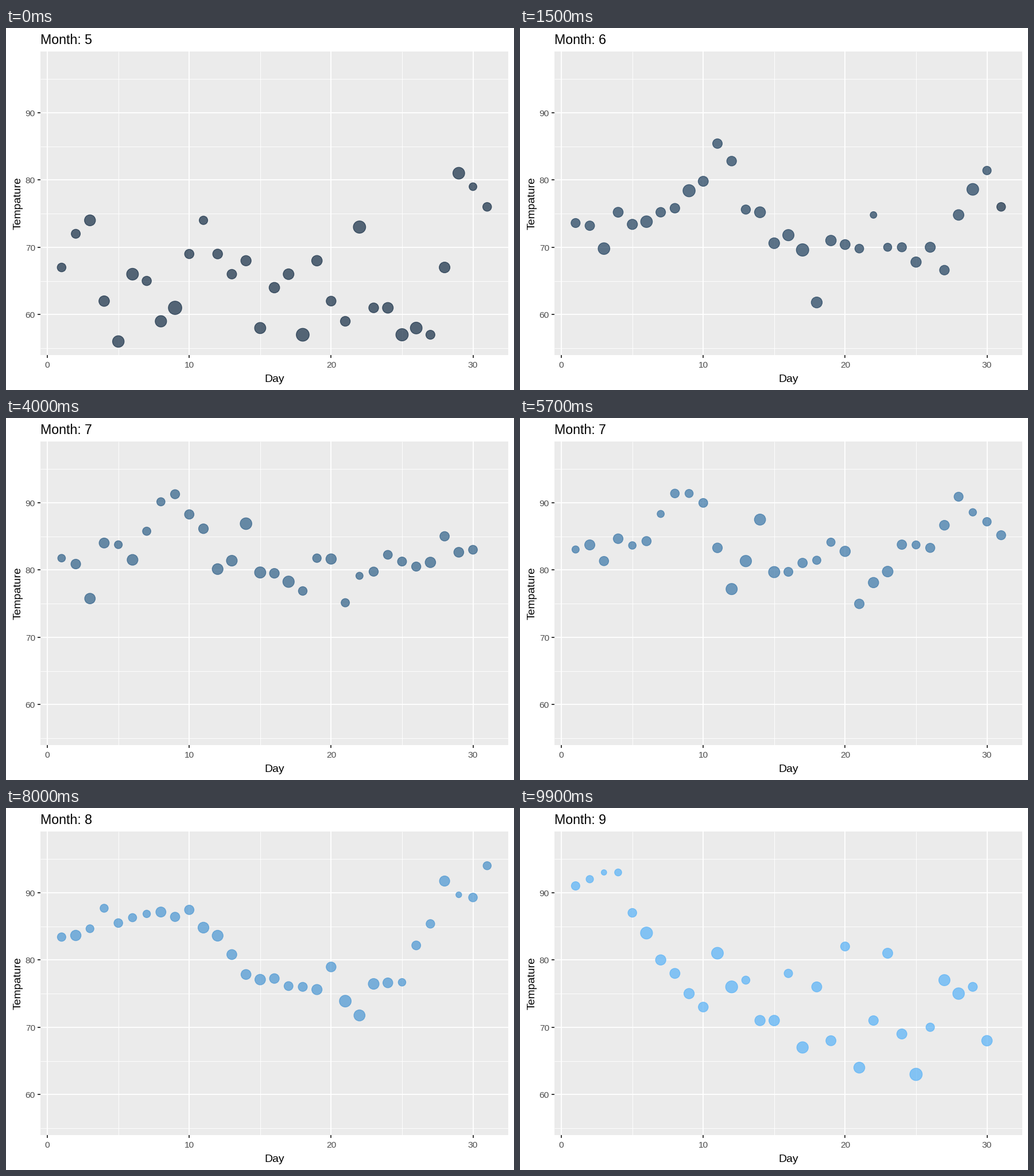
A matplotlib script that plays this animation: 885x632 px, repeating every 10 s.

```python
import numpy as np
import matplotlib.pyplot as plt
from matplotlib.animation import FuncAnimation
from matplotlib.patches import Rectangle

W, H, DPI = 885, 632, 100
RES = W / 7                      # pixels per inch of the plot layout
PT = 72 / DPI                    # points per screen pixel
LEFT, RIGHT, TOP, BOTTOM = 59.8, 875.3, 41.4, 571.4
FRAMES = 100
KEYS = [0, 25, 49, 74, 99]       # frame at which each month is reached

plt.rcParams["font.family"] = "Liberation Sans"

# Daily temperature, then wind speed
MAY = ([67, 72, 74, 62, 56, 66, 65, 59, 61, 69, 74, 69, 66, 68, 58, 64,
        66, 57, 68, 62, 59, 73, 61, 61, 57, 58, 57, 67, 81, 79, 76],
       [7.4, 8, 12.6, 11.5, 14.3, 14.9, 8.6, 13.8, 20.1, 8.6, 6.9, 9.7, 9.2,
        10.9, 13.2, 11.5, 12, 18.4, 11.5, 9.7, 9.7, 16.6, 9.7, 12, 16.6,
        14.9, 8, 12, 14.9, 5.7, 7.4])
JUNE = ([78, 74, 67, 84, 85, 79, 82, 87, 90, 87, 93, 92, 82, 80, 79, 77,
         72, 65, 73, 76, 77, 76, 76, 76, 75, 78, 73, 80, 77, 83],
        [8.6, 9.7, 16.1, 9.2, 8.6, 14.3, 9.7, 6.9, 13.8, 11.5, 10.9, 9.2, 8,
         13.8, 11.5, 14.9, 20.7, 9.2, 11.5, 10.3, 6.3, 1.7, 4.6, 6.3, 8, 8,
         10.3, 11.5, 14.9, 8])
JULY = ([84, 85, 81, 84, 83, 83, 88, 92, 92, 89, 82, 73, 81, 91, 80, 81,
         82, 84, 87, 85, 74, 81, 82, 86, 85, 82, 86, 88, 86, 83, 81],
        [4.1, 9.2, 9.2, 10.9, 4.6, 10.9, 5.1, 6.3, 5.7, 7.4, 8.6, 14.3, 14.9,
         14.9, 14.3, 6.9, 10.3, 6.3, 5.1, 11.5, 6.9, 9.7, 11.5, 8.6, 8, 8.6,
         12, 7.4, 7.4, 7.4, 9.2])
AUGUST = ([81, 81, 82, 86, 85, 87, 89, 90, 90, 92, 86, 86, 82, 80, 79, 77,
           79, 76, 78, 78, 77, 72, 75, 79, 81, 86, 88, 97, 94, 96, 94],
          [6.9, 13.8, 7.4, 6.9, 7.4, 4.6, 4, 10.3, 8, 8.6, 11.5, 11.5, 11.5,
           9.7, 11.5, 10.3, 6.3, 7.4, 10.9, 10.3, 15.5, 14.3, 12.6, 9.7, 3.4,
           8, 5.7, 9.7, 2.3, 6.3, 6.3])
SEPTEMBER = ([91, 92, 93, 93, 87, 84, 80, 78, 75, 73, 81, 76, 77, 71, 71, 78,
              67, 76, 68, 82, 64, 71, 81, 69, 63, 70, 77, 75, 76, 68],
             [6.9, 5.1, 2.8, 4.6, 7.4, 15.5, 10.9, 10.3, 10.9, 9.7, 14.9,
              15.5, 6.3, 10.9, 11.5, 6.9, 13.8, 10.3, 10.3, 8, 12.6, 9.2,
              10.3, 10.3, 16.6, 6.9, 13.2, 14.3, 8, 11.5])

RGB_XYZ = np.array([[.4124564, .3575761, .1804375],
                    [.2126729, .7151522, .0721750],
                    [.0193339, .1191920, .9503041]])
WHITE = RGB_XYZ.sum(axis=1)


def to_lab(rgb):
    c = np.array(rgb) / 255
    c = np.where(c > .04045, ((c + .055) / 1.055) ** 2.4, c / 12.92)
    f = RGB_XYZ @ c / WHITE
    f = np.where(f > .008856, np.cbrt(f), 7.787 * f + 16 / 116)
    return np.array([116 * f[1] - 16, 500 * (f[0] - f[1]), 200 * (f[1] - f[2])])


def to_rgb(lab):
    fy = (lab[0] + 16) / 116
    f = np.array([fy + lab[1] / 500, fy, fy - lab[2] / 200])
    f = np.where(f > .206893, f ** 3, (f - 16 / 116) / 7.787)
    c = np.clip(np.linalg.solve(RGB_XYZ, f * WHITE), 0, 1)
    return np.where(c > .0031308, 1.055 * c ** (1 / 2.4) - .055, 12.92 * c)


DARK, LIGHT = to_lab([0x13, 0x2B, 0x43]), to_lab([0x56, 0xB1, 0xF7])


def shade(u):
    return (*to_rgb(DARK + (LIGHT - DARK) * u), .7)


def px(day):
    return LEFT + (np.asarray(day) + .5) / 33 * (RIGHT - LEFT)


def py(temp):
    return BOTTOM - (np.asarray(temp) - 53.95) / 45.1 * (BOTTOM - TOP)


def radius(wind):
    size = 1 + 5 * np.sqrt((np.asarray(wind) - 1.7) / 19)
    return .375 * (size * 72.27 / 25.4 + .945) * RES / 72


# One row per day: vertical position and radius
MONTHS = [np.column_stack([py(temp), radius(wind)])
          for temp, wind in (MAY, JUNE, JULY, AUGUST, SEPTEMBER)]

fig = plt.figure(figsize=(W / DPI, H / DPI), dpi=DPI, facecolor="white")
ax = fig.add_axes([0, 0, 1, 1])
ax.set(xlim=(0, W), ylim=(H, 0))
ax.axis("off")


def line(x, y, width, color="white"):
    ax.plot(x, y, color=color, lw=width * PT, solid_capstyle="butt", zorder=1)


def label(x, y, text, size, color="black", ha="center", **kw):
    return ax.text(x, y, text, fontsize=size * RES / DPI, color=color,
                   ha=ha, va="baseline", **kw)


ax.add_patch(Rectangle((LEFT, TOP), RIGHT - LEFT, BOTTOM - TOP,
                       fc="#EBEBEB", lw=0, zorder=0))
for temp in range(55, 100, 5):
    line([LEFT, RIGHT], [py(temp)] * 2, .94 if temp % 10 else 1.87)
for day in range(0, 31, 5):
    line([px(day)] * 2, [TOP, BOTTOM], .94 if day % 10 else 1.87)
for temp in range(60, 100, 10):
    line([LEFT - 4.8, LEFT], [py(temp)] * 2, 1.87, "#333333")
    label(51, py(temp) + 6, str(temp), 8.8, "#4D4D4D", "right")
for day in range(0, 31, 10):
    line([px(day)] * 2, [BOTTOM, BOTTOM + 4.8], 1.87, "#333333")
    label(px(day), 593, str(day), 8.8, "#4D4D4D")

label((LEFT + RIGHT) / 2, 618, "Day", 11)
label(25.4, (TOP + BOTTOM) / 2, "Tempature", 11,
      rotation=90, rotation_mode="anchor")
title = label(LEFT, 28, "", 13.2, ha="left")
dots = ax.scatter([], [], zorder=2)
dots.set_linewidth(.945 / 96 * RES * PT)


def update(i):
    m = int(np.searchsorted(KEYS, i, side="right")) - 1
    state = MONTHS[m].copy()
    colors = [shade(m / 4)] * len(state)
    if m < 4:
        t = (i - KEYS[m]) / (KEYS[m + 1] - KEYS[m])
        # A day missing from the next month waits unchanged, then vanishes
        n = min(len(state), len(MONTHS[m + 1]))
        state[:n] += (MONTHS[m + 1][:n] - state[:n]) * t
        colors[:n] = [shade((m + t) / 4)] * n
    y, r = state.T
    dots.set_offsets(np.column_stack([px(np.arange(1, len(y) + 1)), y]))
    dots.set_sizes((2 * r * PT) ** 2)
    dots.set_facecolor(colors)
    dots.set_edgecolor(colors)
    title.set_text(f"Month: {round(5 + 4 * i / (FRAMES - 1))}")
    return dots, title


anim = FuncAnimation(fig, update, frames=FRAMES, interval=100,
                     init_func=lambda: update(0), repeat=True, repeat_delay=0)
plt.show()
```
